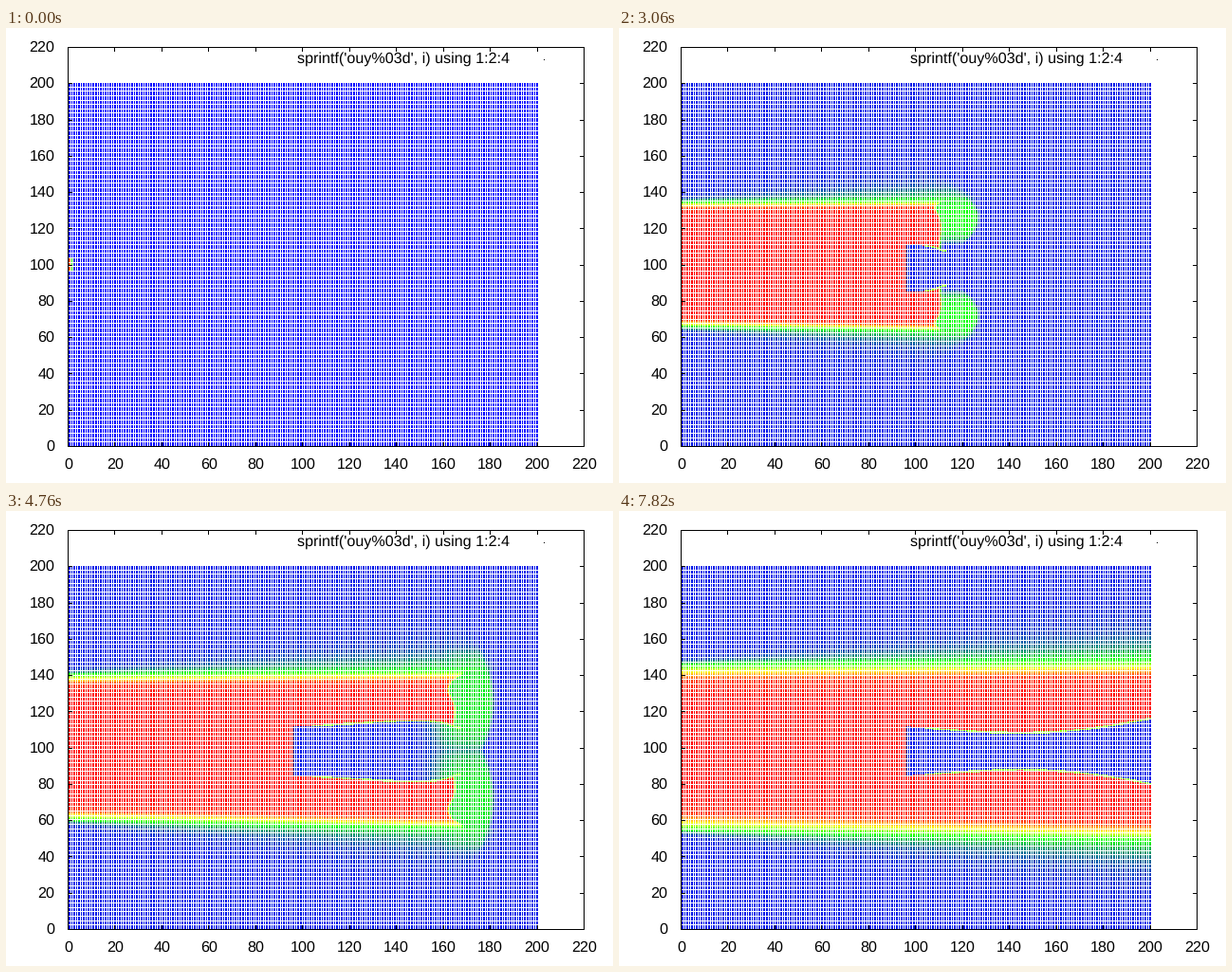
A matplotlib script that plays this animation: 640x480 px, repeating every 7990 ms.

```python
import numpy as np
import matplotlib.pyplot as plt
from matplotlib.animation import FuncAnimation

plt.rcParams["text.hinting"] = "none"

W, H = 640, 480
LEFT, RIGHT, TOP, BOTTOM = 65, 609, 20, 441
FRAMES, STEP = 47, 170
SX, SY = (RIGHT - LEFT) / 220, (BOTTOM - TOP) / 220

# Cell centres and the pixel each one lands on
CELLS, CELL = 301, 2 / 3
grid = (np.arange(CELLS) + 0.5) * CELL
x, y = np.meshgrid(grid, grid)
cols = LEFT + np.floor(grid * SX + 0.5).astype(int)
rows = BOTTOM - np.floor(grid * SY + 0.5).astype(int)

# Palette: blue, green, yellow, red
STOPS = [0, 1 / 3, 2 / 3, 1]
RED, GREEN, BLUE = [0, 0, 255, 255], [0, 255, 255, 0], [255, 0, 0, 0]

BODY_X, BODY_Y, BODY_HALF = 96.3, 98.3, 13.5


def step(d, soft):
    return 1 / (1 + np.exp(-np.clip(d / soft, -40, 40)))


def wake_width(s, core):
    """Half width of the wake: a slow wave that grows downstream."""
    d = np.maximum(x - BODY_X, 0)
    grow = np.clip((s - 2) / 3.5, 0, 1)
    wave = 0.09 * d * grow * np.sin(0.025 * d - 0.3 - 0.88 * (s - 5.78))
    pinch = 4 * np.exp(np.minimum(x - core, 0) / 6)
    return BODY_HALF + wave - pinch


def field(s):
    """Value in 0..1 on the grid after s seconds."""
    tip = 1.5 + 50 * s ** 0.82
    core = tip - 16 * (1 - np.exp(-s))
    half = 37.5 - 34 * np.exp(-s / 1.9)
    mix = 0.3 + 1.1 * s
    split = np.clip((tip - 97) / 25, 0, 1)

    # Jet core with its mixing layer
    dist = np.abs(y - (100.5 - 0.008 * x))
    u = dist - half - 0.02 * x * min(1, s / 4)
    jet = np.interp(u / mix, [-1, 0, 0.5, 1], [1, 0.93, 0.667, 0.333])
    notch = 3 * split * np.exp(-((dist - 33) / 6) ** 2)
    bow = 2 * min(1, s) * np.exp(-(dist / 14) ** 2)
    front = core - notch - bow + np.clip(u, 0, 4) * min(1, s / 3)
    jet = np.where(u <= mix, jet, 0) * step(front - x, 0.35)

    # Wake of the obstacle with a thin bright rim
    behind = x > BODY_X
    gap = np.abs(y - BODY_Y) - wake_width(s, core)
    jet = np.where(behind & (gap < 0), 0, jet)
    rim = (x > 104) & (np.abs(gap) < 0.5) & (x < core + 2)
    jet = np.where(rim, 0.5, jet)

    # Diffuse halo and leading head
    spread = (1 - split) * (half + 1) + split * (15 + 0.32 * (tip - 127))
    off = (np.abs(y - 99) - 27 * split) / spread
    edge = tip - 7 * off ** 2
    reach = (1 + 0.045 * x) * min(1, s / 1.5) + 0.2
    halo = np.exp(-np.maximum(u - mix, 0) / reach) / 3
    halo = np.where(u > mix, halo, 0) * step(edge - x, 1.5)
    head = 0.4 * min(1, s) * np.exp(-s / 14) * np.clip(1 - off ** 4, 0, 1)
    head = head * step(edge - x, 0.4) * step(x - tip + 24, 3)
    head = np.where(behind | (tip < BODY_X + 2), head, 0)

    low = 0 if s < 1.36 else 0.03
    return low + (1 - low) * np.maximum(jet, np.maximum(halo, head))


def draw_axes(img):
    img[[TOP, BOTTOM], LEFT:RIGHT + 1] = 0
    img[TOP:BOTTOM + 1, [LEFT, RIGHT]] = 0
    for v in range(0, 221, 20):
        px = LEFT + int(v * SX + 0.5)
        py = BOTTOM - int(v * SY + 0.5)
        img[TOP:TOP + 5, px] = 0
        img[BOTTOM - 4:BOTTOM + 1, px] = 0
        img[py, LEFT:LEFT + 5] = 0
        img[py, RIGHT - 4:RIGHT + 1] = 0
    img[33, 567] = 0  # key sample


def render(i):
    v = field(i * STEP / 1000)
    img = np.full((H, W, 3), 255, np.uint8)
    rgb = np.stack([np.interp(v, STOPS, c) for c in (RED, GREEN, BLUE)], -1)
    img[rows[:, None], cols] = rgb.astype(np.uint8)
    draw_axes(img)
    return img


fig = plt.figure(figsize=(W / 100, H / 100), dpi=100, facecolor="white")
ax = fig.add_axes([0, 0, 1, 1])
ax.axis("off")
picture = ax.imshow(render(0), extent=(0, W, H, 0), interpolation="nearest",
                    aspect="auto")
ax.set_xlim(0, W)
ax.set_ylim(H, 0)


def label(px, py, text, ha):
    ax.text(px, py, text, ha=ha, va="baseline", color="black",
            family="Liberation Sans", size=11.6)


for v in range(0, 221, 20):
    label(LEFT + v * SX + 0.5, 464.5, str(v), "center")
    label(51.5, BOTTOM - v * SY + 5, str(v), "right")
label(531, 37, "sprintf('ouy%03d', i) using 1:2:4", "right")


def update(i):
    picture.set_data(render(i))
    return [picture]


anim = FuncAnimation(fig, update, frames=FRAMES, interval=STEP, repeat=True,
                     repeat_delay=0, blit=False)
plt.show()
```
